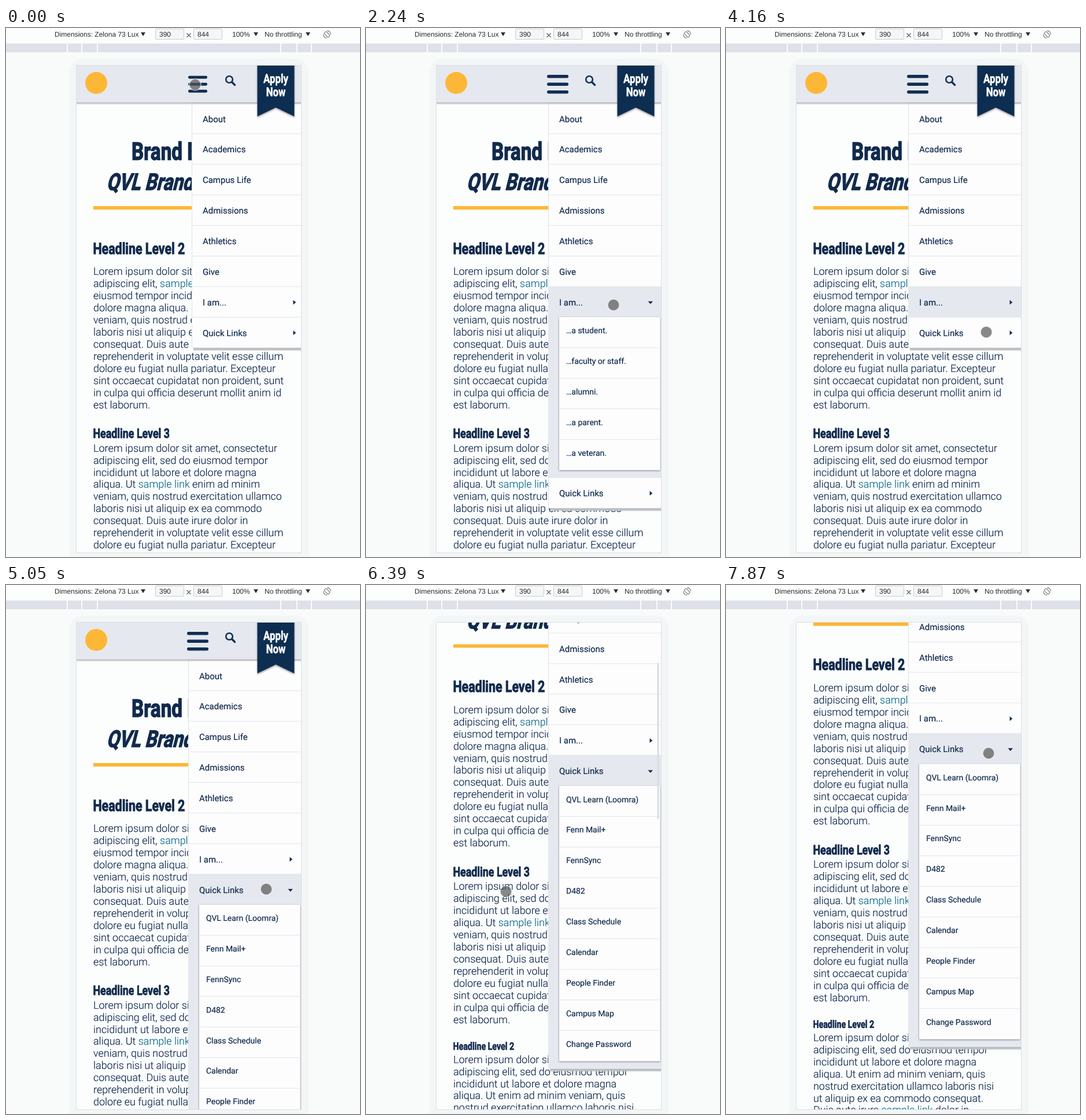
Write an HTML page that moves like this. It is 612 px wide and 915 px high and loops after 8000 ms.

```html
<!DOCTYPE html>
<html lang="en">
<head>
<meta charset="utf-8">
<title>Mobile menu</title>
<style>
  html, body { margin: 0; width: 100%; height: 100%; overflow: hidden; background: #f8fbfa; }
  svg { display: block; width: 612px; height: 915px; }
  text { font-family: Roboto, sans-serif; fill: #112a4d; white-space: pre; text-rendering: geometricPrecision; }
  .tool { font: 12px "Liberation Sans", Arial, sans-serif; fill: #282b2e; }
  .head { font-weight: 700; stroke: #112a4d; stroke-width: .035em; }
  .ribbon { font-weight: 700; fill: #fff; stroke: #fff; stroke-width: .025em; text-anchor: middle; }
  .body, .row, .item { stroke: #112a4d; stroke-width: .2; }
  .body { font-size: 17.96px; font-weight: 300; }
  .link { fill: #0e6b8a; stroke: #0e6b8a; }
  .row { font-size: 14.96px; }
  .item { font-size: 13.97px; }
  .rule { stroke: #e1e4e8; stroke-width: 1; }
  .navy { fill: #112e51; }
</style>
</head>
<body>
<svg viewBox="0 0 612 915" xmlns="http://www.w3.org/2000/svg">
  <defs>
    <clipPath id="screenClip"><rect x="121" y="65" width="390" height="842"/></clipPath>
    <filter id="drop" x="-20%" y="-20%" width="140%" height="150%">
      <feDropShadow dx="0" dy="2" stdDeviation="1.5" flood-color="#000" flood-opacity=".36"/>
    </filter>
    <filter id="panelDrop" x="-10%" y="-10%" width="120%" height="120%">
      <feDropShadow dx="0" dy="1" stdDeviation="1.8" flood-color="#000" flood-opacity=".5"/>
    </filter>
    <linearGradient id="under" x2="0" y2="1">
      <stop offset="0" stop-color="#b2b5b8"/>
      <stop offset=".55" stop-color="#bfc2c4"/>
      <stop offset="1" stop-color="#bfc2c4" stop-opacity="0"/>
    </linearGradient>
  </defs>
  <g id="toolbar"></g>
  <rect x="110" y="53" width="413" height="890" rx="22" fill="#f3f6f6"/>
  <g clip-path="url(#screenClip)">
    <rect x="121" y="65" width="390" height="842" fill="#fcfdfd"/>
    <g id="page">
      <g id="content"></g>
      <g id="menu"></g>
      <g id="header"></g>
    </g>
    <rect id="thumb" x="503.5" width="3" height="270" rx="1.5" fill="#d9dce0"/>
  </g>
  <rect x="121.5" y="64.5" width="389" height="843" fill="none" stroke="#dcdfe2"/>
  <circle id="cursor" r="10" fill="#555" fill-opacity=".7" stroke="#fff" stroke-opacity=".55" stroke-width="1.5"/>
</svg>
<script>
const $ = id => document.getElementById(id);
const LOOP = 8000, PITCH = 52.88, PAD = 13, TOP = 130, RIGHT = 511, LEADING = 20.95;
const CONDENSE = 0.786;

const rows = ['About', 'Academics', 'Campus Life', 'Admissions', 'Athletics', 'Give', 'I am...', 'Quick Links'];
const subs = {
  6: ['…a student.', '…faculty or staff.', '…alumni.', '…a parent.', '…a veteran.'],
  7: ['QVL Learn (Loomra)', 'Fenn Mail+', 'FennSync', 'D482', 'Class Schedule',
      'Calendar', 'People Finder', 'Campus Map', 'Change Password']
};

const text = (cls, x, y, str) => `<text class="${cls}" x="${x}" y="${y}">${str}</text>`;
const rect = (x, y, w, h, fill, more = '') =>
  `<rect x="${x}" y="${y}" width="${w}" height="${h}" fill="${fill}" ${more}/>`;
const line = (x1, x2, y) => `<line class="rule" x1="${x1}" x2="${x2}" y1="${y}" y2="${y}"/>`;
const narrow = (cls, x, y, size, str, skew = 0) =>
  `<text class="${cls}" font-size="${size}" transform="translate(${x} ${y}) skewX(${skew}) scale(${CONDENSE} 1)">${str}</text>`;
const caret = x => `<path d="M${x - 4} 7.5h8l-4 6.5z" fill="#282b2e"/>`;

function paragraph(y, lines) {
  return lines.map((s, i) => text('body', 151, y + i * LEADING,
    s.replace(/\{(.*?)\}/, '<tspan class="link">$1</tspan>'))).join('');
}

function buildToolbar() {
  const box = x => rect(x + .5, 1.5, 49, 18, '#f4f6f7', 'rx="1" stroke="#c9cccf"');
  $('toolbar').innerHTML =
    rect(0, 0, 612, 25, '#fcfdfd') +
    text('tool', 84, 15, 'Dimensions: Zelona 73 Lux') + caret(237) +
    box(258) + text('tool', 265, 15, '390') +
    '<path d="M312.5 9l7 7m0-7l-7 7" stroke="#55585b" stroke-width="1.1"/>' +
    box(324) + text('tool', 331, 15, '844') +
    text('tool', 391, 15, '100%') + caret(432) +
    text('tool', 447, 15, 'No throttling') + caret(522) +
    `<g transform="translate(555 11) rotate(-45)" fill="none" stroke="#6d7073" stroke-width="1.1">
      <rect x="-2.5" y="-5" width="5" height="10" rx="1"/>
      <path d="M-4.5 -4.5A6.3 6.3 0 0 0 -4.5 4.5M4.5 -4.5A6.3 6.3 0 0 1 4.5 4.5"/></g>` +
    rect(0, 27, 612, 15, '#dfe1e9') +
    [105, 130, 157, 474, 502, 527].map(x => rect(x, 27, 2, 15, '#fbfcfc')).join('');
}

function buildContent() {
  const open = 'Lorem ipsum dolor sit amet, consectetur';
  const close = [
    'laboris nisi ut aliquip ex ea commodo', 'consequat. Duis aute irure dolor in',
    'reprehenderit in voluptate velit esse cillum', 'dolore eu fugiat nulla pariatur. Excepteur',
    'sint occaecat cupidatat non proident, sunt', 'in culpa qui officia deserunt mollit anim id',
    'est laborum.'];
  const middle = ['adipiscing elit, sed do eiusmod tempor', 'incididunt ut labore et dolore magna'];
  $('content').innerHTML =
    narrow('head', 217, 228, 42.3, 'Brand Elements') +
    narrow('head', 173.5, 280, 39.8, 'QVL Brand', -14) +
    rect(151, 308, 330, 6, '#fdb736') +
    narrow('head', 150.5, 390.6, 27.2, 'Headline Level 2') +
    paragraph(427.2, [open, 'adipiscing elit, {sample link}, sed do',
      'eiusmod tempor incididunt ut labore et', 'dolore magna aliqua. Ut enim ad minim',
      'veniam, quis nostrud exercitation', ...close]) +
    narrow('head', 150.5, 709.2, 22.7, 'Headline Level 3') +
    paragraph(732.6, [open, ...middle, 'aliqua. Ut {sample link} enim ad minim',
      'veniam, quis nostrud exercitation ullamco', ...close]) +
    narrow('head', 150.5, 1009.7, 18.1, 'Headline Level 2') +
    paragraph(1032.1, [open, ...middle, 'aliqua. Ut enim ad minim veniam, quis',
      'nostrud exercitation ullamco laboris nisi', 'ut aliquip ex ea commodo consequat.',
      'Duis aute irure {sample link} dolor in']);
}

function buildHeader() {
  $('header').innerHTML =
    rect(121, 65, 390, 63.5, '#e5e8ee', 'filter="url(#drop)"') +
    '<circle cx="156" cy="95" r="19" fill="#fdb736"/>' +
    '<g id="bars">' + [-13.8, -.3, 13.2].map(y => rect(-18.5, y - 2.75, 37, 5.5, '#112e51', 'rx="2.6"')).join('') + '</g>' +
    '<path d="M390.5 93.5l5 5" stroke="#112e51" stroke-width="3.2" stroke-linecap="round"/>' +
    '<circle cx="386" cy="89" r="5.8" fill="none" stroke="#112e51" stroke-width="2.6"/>' +
    '<path class="navy" d="M434.5 60h64v93l-32-15.5l-32 15.5z" filter="url(#drop)"/>' +
    narrow('ribbon', 466.5, 94.8, 21.4, 'Apply') + narrow('ribbon', 466.5, 117.8, 21.4, 'Now');
}

function buildMenu() {
  const panel = k => {
    const items = subs[k].map((s, i) =>
      text('item', 30, i * PITCH + 28, s) + (i ? line(18, 192.5, i * PITCH) : '')).join('');
    return `<g id="sub${k}" transform="translate(0 ${PITCH})">
      <clipPath id="clip${k}"><rect id="clipBox${k}" x="18" width="174.5"/></clipPath>
      ${rect(18, 0, 174.5, 0, '#fdfdfe', `id="panel${k}" filter="url(#panelDrop)"`)}
      <g clip-path="url(#clip${k})">${items}</g></g>`;
  };
  $('menu').innerHTML =
    rect(2, 0, 198, 6, 'url(#under)', 'id="shade"') +
    rect(-.5, -1, 200, 0, '#fdfdfe', 'id="sheet" stroke="#dfe2e6"') +
    rows.map((s, i) => `<g id="row${i}">` +
      (subs[i] ? rect(-.5, 0, 200, PITCH, '#e5e8ee', `id="glow${i}"`) : '') +
      (i ? line(0, 200, 0) : '') + text('row', 18, 32.5, s) +
      (subs[i] ? `<path id="arrow${i}" class="navy"/>` + panel(i) : '') + '</g>').join('');
}

// Each entry is [time, ...values], held until the next one.
const tracks = {
  menuX: [[0, 322], [150, 320], [300, 317.5], [450, 316]],
  cursor: [
    [0, 327, 98], [150, 343, 140], [300, 398, 302], [450, 421, 378],
    [750, 422, 392], [900, 426, 452], [1050, 427, 503], [1200, 428, 491], [1350, 428, 479],
    [3890, 432, 487], [4040, 444, 512], [4160, 450, 526],
    [5500, 438, 527], [5650, 350, 529], [5800, 262, 530], [5940, 242, 530],
    [7120, 250, 521], [7270, 300, 465], [7420, 372, 384], [7570, 426, 322], [7720, 448, 298], [7870, 454, 291]],
  open6: [[0, 0], [1940, .12], [2090, .65], [2240, 1], [3440, .85], [3590, .35], [3740, 0]],
  open7: [[0, 0], [4760, .12], [4910, .65], [5050, 1]],
  active: [[0, -1], [1940, 6], [4760, 7]],
  scroll: [[0, 0], [5940, 25], [6090, 89.8], [6240, 152], [6390, 205.5], [6530, 233], [6680, 243.3]],
  thumb: [[0, 0], [5940, 1], [7120, .5], [7270, 0]]
};
const at = (name, t) => tracks[name].findLast(k => k[0] <= t).slice(1);

function set(id, attrs) {
  for (const key in attrs) $(id).setAttribute(key, attrs[key]);
}

function render(t) {
  const [x] = at('menuX', t), [scroll] = at('scroll', t), [active] = at('active', t);
  const [cx, cy] = at('cursor', t);
  set('page', { transform: `translate(0 ${-scroll})` });
  set('menu', { transform: `translate(${x} ${TOP})` });
  set('bars', { transform: `translate(331.5 97.5) scale(${1 - (x - 316) / 55})` });

  let y = 0;
  rows.forEach((_, i) => {
    set('row' + i, { transform: `translate(0 ${y})` });
    y += PITCH;
    if (!subs[i]) return;
    const [open] = at('open' + i, t);
    const h = subs[i].length * PITCH * open;
    set('panel' + i, { height: h });
    set('clipBox' + i, { height: h });
    set('sub' + i, { display: open ? 'inline' : 'none' });
    set('glow' + i, { height: PITCH + h + PAD * open, opacity: active === i ? 1 : 0 });
    set('arrow' + i, { d: open ? 'M171.5 25.5h8.5l-4.25 4.8z' : 'M174.5 23.2v8l4.8-4z' });
    y += h + PAD * open;
  });
  set('sheet', { height: y + 1, width: RIGHT - x + 1 });
  set('shade', { y });

  set('thumb', { y: 67.5 + .328 * scroll, opacity: at('thumb', t)[0] });
  set('cursor', { cx, cy });
}

buildToolbar();
buildContent();
buildMenu();
buildHeader();

const start = performance.now();
function tick() {
  render((performance.now() - start) % LOOP);
  requestAnimationFrame(tick);
}
tick();
</script>
</body>
</html>
```
